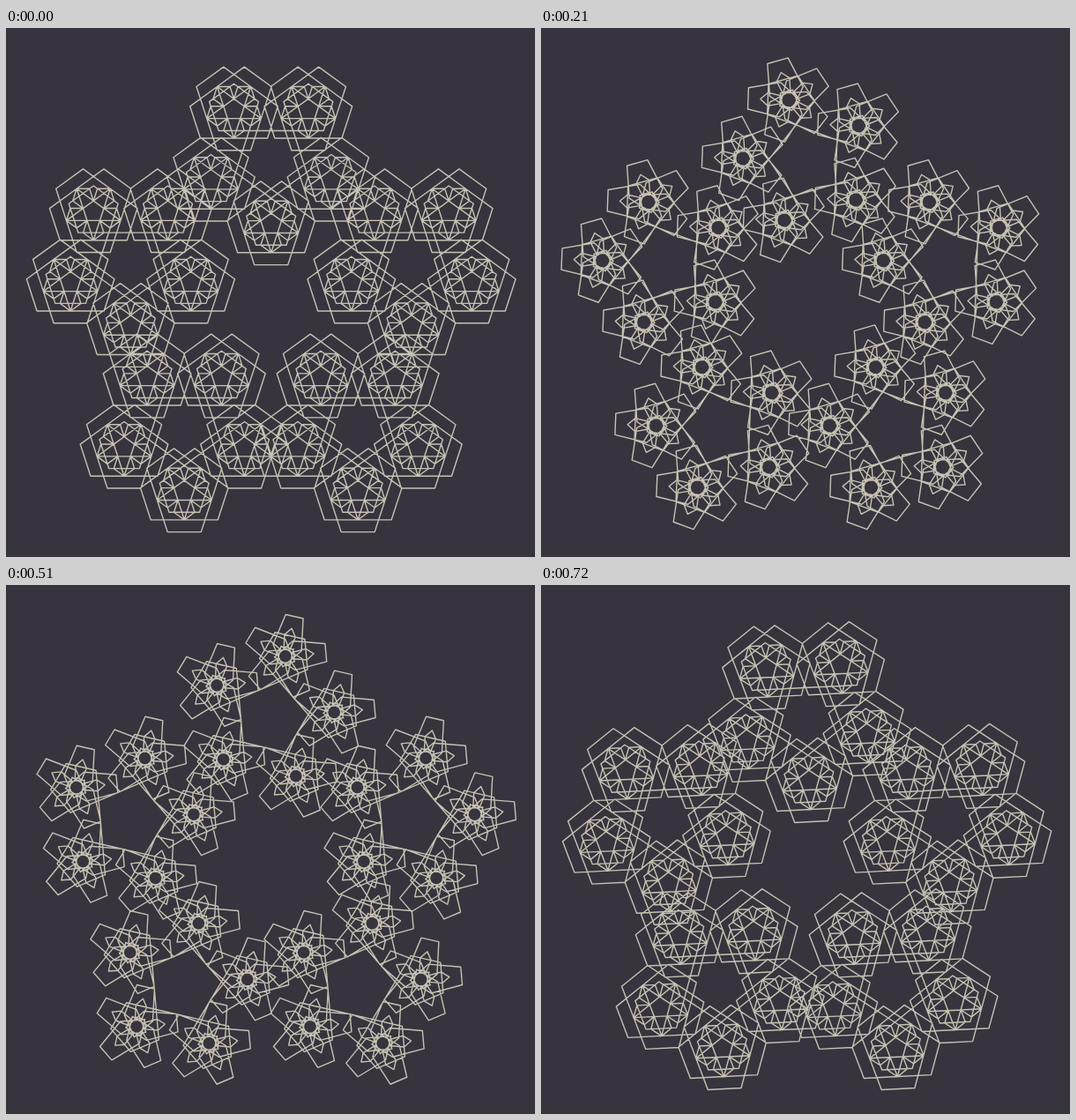
An HTML page with a canvas that plays this animation: 600x600 px, repeating every 0.75 s.

```html
<!DOCTYPE html>
<html lang="en">
<head>
<meta charset="utf-8">
<title>Turning pentagons</title>
<style>
  html, body { margin: 0; width: 100%; height: 100%; overflow: hidden; background: #37343d; }
  canvas { display: block; width: 600px; height: 600px; }
</style>
</head>
<body>
<canvas id="stage" width="600" height="600"></canvas>
<script>
const ctx = document.getElementById('stage').getContext('2d');
const LOOP = 750, STEP = 30;
const FIFTH = Math.PI * 2 / 5;
const PHI = (1 + Math.sqrt(5)) / 2;

const ARM = 20;                       // petal distance from its node
const SMALL = ARM / PHI;              // petal radius
const LARGE = ARM * PHI;              // radius of the overlapping outlines
const NODE = 29.4;                    // rigid pentagons, joined at a corner
const CORE = LARGE * PHI * PHI / 2;
const RING = 167.5;

const around = (x, y, r, start, fn) => {
  for (let k = 0; k < 5; k++) {
    const a = start + k * FIFTH;
    fn(x + r * Math.cos(a), y + r * Math.sin(a), a);
  }
};

// Pentagon along direction a; squash narrows it across that axis
function pentagon(x, y, r, a, squash = 1) {
  const cos = Math.cos(a), sin = Math.sin(a);
  for (let k = 0; k < 5; k++) {
    const u = r * Math.cos(k * FIFTH), v = r * Math.sin(k * FIFTH) * squash;
    const px = x + u * cos - v * sin, py = y + u * sin + v * cos;
    k ? ctx.lineTo(px, py) : ctx.moveTo(px, py);
  }
  ctx.closePath();
}

function draw(p) {
  const turn = Math.PI / 2 + p * FIFTH;
  const flip = Math.cos(p * Math.PI);
  ctx.fillStyle = '#37343d';
  ctx.fillRect(0, 0, 600, 600);
  ctx.strokeStyle = '#c8c1b4';
  ctx.lineWidth = 1.4;
  ctx.lineJoin = 'round';
  ctx.beginPath();
  around(300.7, 318.2, RING, -Math.PI / 2, (cx, cy) => {
    pentagon(cx, cy, CORE, turn);
    around(cx, cy, CORE + NODE, turn, (nx, ny) => {
      pentagon(nx, ny, NODE, turn + Math.PI);
      around(nx, ny, ARM, turn, (x, y, a) => {
        pentagon(x, y, -LARGE, a, flip);
        pentagon(x, y, SMALL, a, flip);
      });
    });
  });
  ctx.stroke();
}

function frame() {
  const t = performance.now() % LOOP;
  draw(Math.floor(t / STEP) * STEP / LOOP);
  requestAnimationFrame(frame);
}
frame();
</script>
</body>
</html>
```
